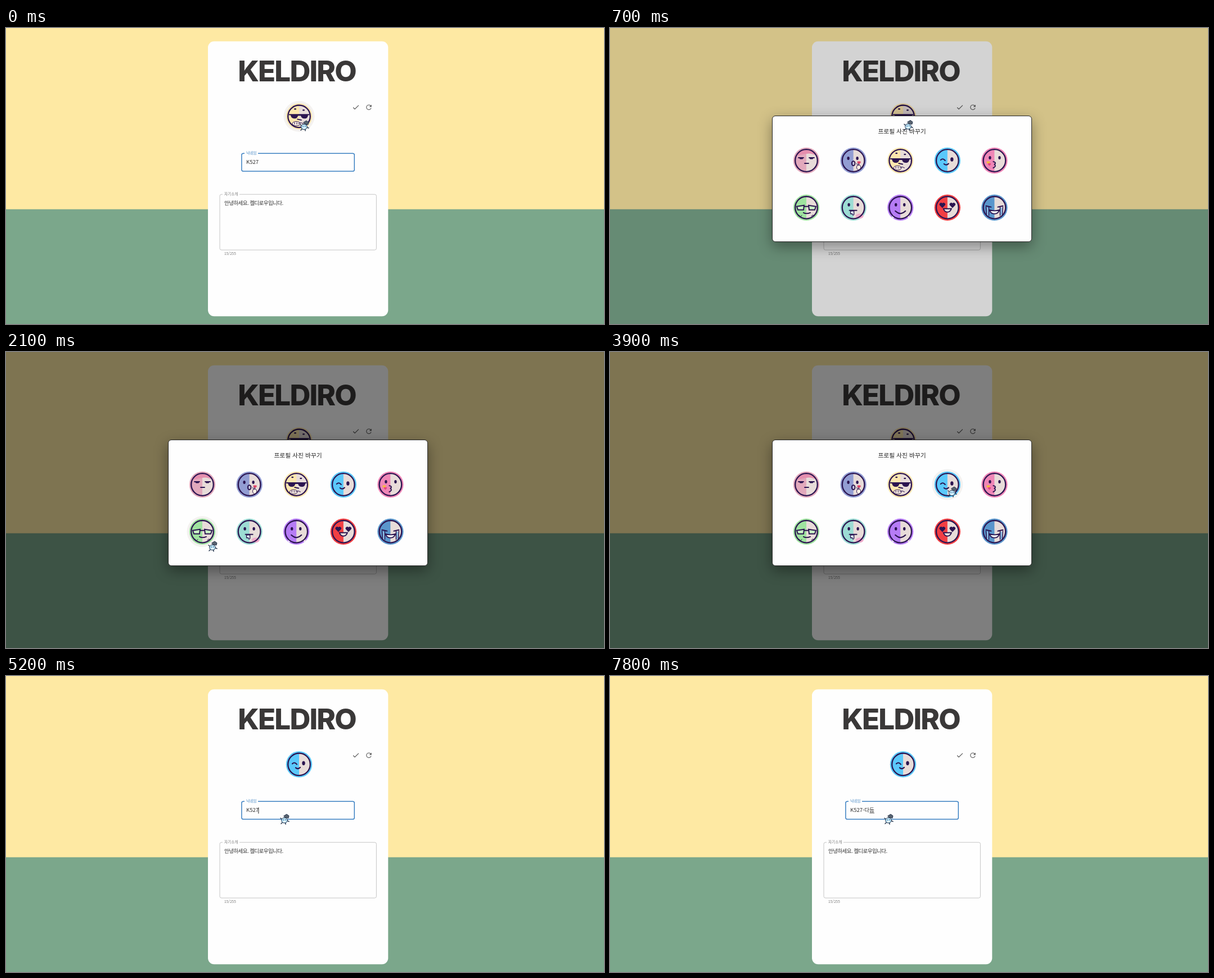
Recreate the animation shown at these times as an HTML page. Size 1063x527 px, loop 8000 ms.

```html
<!DOCTYPE html>
<html lang="ko">
<head>
<meta charset="utf-8">
<title>Profile editor</title>
<style>
  html, body { margin: 0; width: 100%; height: 100%; overflow: hidden; background: #7ba78b; }
  svg { display: block; width: 100%; height: 100%; }
  text { font-family: "Noto Sans CJK KR", "Noto Sans CJK", "Noto Sans", sans-serif; fill: #333; white-space: pre; }
  .brand { font: 800 51px Inter, sans-serif; letter-spacing: -1.8px; fill: #3a3838; text-anchor: middle; }
  .small { font-size: 6.6px; fill: #777; }
  .value { font-size: 9.5px; }
  .intro { letter-spacing: -.55px; }
  .title { font-size: 10.75px; fill: #222; text-anchor: middle; }
  .panel { filter: drop-shadow(0 8px 12px rgba(0, 0, 0, .38)); }
  .ink { fill: none; stroke: #2b1450; stroke-width: 2; stroke-linecap: round; stroke-linejoin: round; }
  .solid { fill: #2b1450; }
  .ring { fill: #f4f2f0; }
</style>
</head>
<body>
<svg viewBox="0 0 1063 527" preserveAspectRatio="none">
  <rect width="1063" height="323" fill="#fee9a3"/>
  <rect y="322.7" width="1063" height="204.3" fill="#7ba78b"/>
  <rect x="359" y="23.7" width="320.3" height="489.6" rx="11" fill="#fefefe"/>
  <text class="brand" x="517" y="95">KELDIRO</text>
  <g fill="#5c5c5c">
    <path transform="translate(614.7 133.9) scale(.6)" d="M9 16.17 4.83 12l-1.42 1.41L9 19 21 7l-1.41-1.41z"/>
    <path transform="translate(637.8 134) scale(.6)" d="M17.65 6.35A8 8 0 1 0 19.73 14h-2.08A6 6 0 1 1 12 6c1.66 0 3.14.69 4.22 1.78L13 11h7V4z"/>
  </g>
  <g id="main"></g>

  <rect id="field" x="418.9" y="223.3" width="200.4" height="31.8" rx="3" fill="none"/>
  <rect x="424" y="220" width="24" height="6" fill="#fefefe"/>
  <text id="label" class="small" x="427" y="224.7">닉네임</text>
  <text id="name" class="value" x="427" y="241.8"></text>
  <path id="under" stroke="#333" stroke-width=".8"/>
  <path id="caret" stroke="#222" stroke-width="1"/>

  <rect x="380" y="296.2" width="278.4" height="99" rx="3" fill="none" stroke="#c6c6c6"/>
  <rect x="385" y="293" width="30" height="6" fill="#fefefe"/>
  <text class="small" x="388" y="297.7">자기소개</text>
  <text class="value intro" x="388" y="314.6">안녕하세요. 켈디로우입니다.</text>
  <text class="small" x="388" y="404">15/255</text>

  <rect id="shade" width="1063" height="527"/>
  <g id="dialog">
    <rect class="panel" x="288.5" y="156.5" width="461" height="224" rx="5.5" fill="#fefefe" stroke="#242424"/>
    <text class="title" x="519" y="188">프로필 사진 바꾸기</text>
    <g id="grid"></g>
  </g>

  <g id="cursor" stroke="#27374f" stroke-linecap="round" stroke-linejoin="round">
    <path d="M-3 1L-7 -2M-3 5L-6 8M2 6L2 9M5 3L8 4" fill="none" stroke-width="1.5"/>
    <ellipse cx="0" cy="2" rx="5.4" ry="4.8" fill="#b9e3f8" stroke-width="1"/>
    <path d="M-3 4Q0 7 3 3" fill="#fff" stroke="none"/>
    <path d="M-2 .8v.8M2 .4v.8" stroke-width="1"/>
    <path d="M-1 -6L4 -9L8 -6L7 -2L1 -3Z" fill="#59636f" stroke-width="1"/>
  </g>
</svg>
<script>
const $ = id => document.getElementById(id);
const ink = (d, w = 2) => `<path class="ink" style="stroke-width:${w}" d="${d}"/>`;
const dot = (x, y, rx = 2.2, ry = 3) => `<ellipse class="solid" cx="${x}" cy="${y}" rx="${rx}" ry="${ry}"/>`;
const blob = (x, y, rx, ry, fill) => `<ellipse cx="${x}" cy="${y}" rx="${rx}" ry="${ry}" fill="${fill}"/>`;
const heart = (x, y, s, fill) =>
  `<path transform="translate(${x} ${y}) scale(${s})" fill="${fill}" d="M0 4L-4 0A2.3 2.3 0 0 1 0-3A2.3 2.3 0 0 1 4 0Z"/>`;
const hand = (x, y, rx, ry) =>
  `<ellipse cx="${x}" cy="${y}" rx="${rx}" ry="${ry}" fill="#fff3e6" stroke="#2b1450"/>`;

// Colour and features of each face, around its centre
const faces = [
  ["#e2a9bc",
    `<path d="M-17-9A19.3 19.3 0 0 1 17-9Q8-14 0-12Q-9-10-17-9Z" fill="#e58fae"/>` +
    ink("M-14-5H-5M5-5H14", 1.8) + ink("M-11-3.6H-7M7-3.6H11", 2) + ink("M-3 5H4", 1.8)],
  ["#929dd3",
    dot(-9, -4) + dot(7, -4) +
    `<ellipse class="ink" cx="0" cy="5" rx="2.8" ry="4"/>` +
    heart(10, 4, .7, "#e2496c") + hand(9.5, 12, 3.6, 4.6) + ink("M8 9l-2-4M10 9l-1-4", 1)],
  ["#fce6ae",
    dot(-7, -13, 2, 1.2) + dot(8, -11, 2, 1.2) +
    `<path class="solid" d="M-18-4H18V-2H16Q15 4 10 4Q4 4 3-1H-2Q-3 4-8 4Q-14 4-15-2H-18Z"/>` +
    ink("M-3 5L4 6.5", 1.8) + hand(-5, 13, 7, 3.8) + ink("M-8 14v-3M-4 14v-3M-1 13q4-3 8 0", 1.1)],
  ["#5ac8fb",
    ink("M-12-1Q-8-5-4 0", 2.1) + dot(8, -2, 2.7, 3.7) + ink("M-6 6Q-2 9.5 2 5.5", 2.3)],
  ["#ef86b7",
    dot(-8, -5) + dot(9, -5) + ink("M-2 2Q4 3 0 7Q4 10-2 13", 2) +
    heart(-11, 4, .7, "#f5b942") + heart(-9, 7, .6, "#e9447f")],
  ["#9fe39f",
    `<path d="M-17-2L-4-4L-5 4H-15ZM4-4L17-2L15 4H5Z" fill="#c8f2c4" stroke="#2b1450" stroke-width="2"/>` +
    ink("M-4-2H4", 2) + ink("M-5 9Q0 12 7 9", 2) +
    ink("M-15 15l2-2l2 3l3-2M9 15l3-2l2 2", 1)],
  ["#9cdcd4",
    dot(-8, -5) + dot(8, -5) + ink("M-7 5H6") +
    `<path d="M-5 6H1V12Q-1 15-2 11H-5Z" fill="#e6fbff" stroke="#2b1450" stroke-width="1.4"/>` +
    blob(11, 15, 7, 4.4, "#eeaac9")],
  ["#b67cf5",
    dot(-8, -5) + dot(7, -5) + ink("M-9 6Q0 15 9 6", 2.2) +
    blob(-13, 16, 2, 3, "#efe3ff") + blob(14, 15, 2, 3, "#fff3e6")],
  ["#f23f43",
    heart(-9, -4, 1.15, "#2b1450") + heart(9, -4, 1.15, "#2b1450") +
    `<path d="M-7 2H7Q5 8 0 8Q-5 8-7 2Z" fill="#f6e4df" stroke="#2b1450" stroke-width="2"/>`],
  ["#5a96cc",
    ink("M-15-3L-6-1M6-1L15-3") +
    `<path d="M-9 4Q0 7 9 4Q7 11 0 11Q-7 11-9 4Z" fill="#f2f5f8" stroke="#2b1450" stroke-width="1.8"/>` +
    `<path d="M-12 0V14M12 0V14" stroke="#8cbfe6" stroke-width="3"/>` +
    ink("M-10-1V14M-15-1L-14 12M10-1V14M15-1L14 12", 1.5)]
];

const face = (i, x, y) => {
  const [color, parts] = faces[i];
  return `<g transform="translate(${x} ${y})"><circle class="ring" r="27.5"/>
    <circle r="23.2" fill="${color}"/><path d="M0-19.7A19.7 19.7 0 0 1 0 19.7Z" fill="#e8dcd9"/>
    ${parts}<circle class="ink" r="19.8" style="stroke-width:2.3"/></g>`;
};

const spots = faces.map((_, i) => [349 + (i % 5) * 83.6, i < 5 ? 236 : 319.8]);
$("grid").innerHTML = spots.map((p, i) => face(i, ...p)).join("");
$("main").innerHTML = [2, 3].map(i => face(i, 521, 157.3)).join("");
const [oldFace, newFace] = $("main").children;
const gridRings = [...$("grid").querySelectorAll(".ring")];
const show = (el, on) => { el.style.display = on ? "" : "none"; };

// Pointer route: time, x, y
const route = [
  [0, 530, 174], [1000, 530, 173], [1100, 540, 192], [1300, 697, 318], [1500, 530, 405],
  [1700, 335, 380], [1800, 315, 350], [1900, 340, 342], [2000, 356, 344],
  [2100, 367, 346], [2500, 367, 346], [2800, 449, 338], [2900, 449, 338],
  [3200, 525, 328], [3600, 647, 232], [3800, 612, 248], [3900, 608, 249],
  [4400, 608, 249], [4900, 494, 254], [5100, 494, 254], [5200, 495, 255], [8000, 495, 255]
];
const pointer = t => {
  const k = route.findIndex(p => p[0] > t);
  const [t0, x0, y0] = route[k - 1], [t1, x1, y1] = route[k];
  const f = (t - t0) / (t1 - t0);
  return [x0 + (x1 - x0) * f, y0 + (y1 - y0) * f];
};

// Typing: time, text, caret x, start of the syllable being composed
const typing = [
  [0, "K527", 448.5, 0], [6400, "K527-", 453, 0], [6600, "K527-ㄷ", 461.5, 453],
  [6800, "K527-다", 462, 453], [7000, "K527-닫", 463, 453],
  [7600, "K527-다드", 470, 461.5], [7700, "K527-다듬", 470, 461.5]
];
const blinks = [[4900, 5400], [5800, 6300], [6400, 7400], [7600, 7800]];
const fade = { 600: .06, 700: .17, 800: .36 };

function draw(now) {
  const t = Math.floor(now % 8000 / 100) * 100;
  const [x, y] = pointer(t);
  $("cursor").setAttribute("transform", `translate(${x} ${y})`);

  const open = t >= 600 && t < 4200;
  show($("dialog"), open);
  $("dialog").style.opacity = t === 600 ? .6 : 1;
  $("shade").style.opacity = open ? fade[t] ?? .5 : 0;
  gridRings.forEach((r, i) => show(r, Math.hypot(x - 9 - spots[i][0], y - 9 - spots[i][1]) < 23));
  show(oldFace, t < 4200);
  show(newFace, t >= 4200);
  show(oldFace.querySelector(".ring"), t < 600);
  show(newFace.querySelector(".ring"), false);

  const focus = t < 400 || t >= 4900;
  $("field").setAttribute("stroke", focus ? "#3b80c2" : t >= 4200 ? "#484848" : "#c6c6c6");
  $("field").setAttribute("stroke-width", focus ? 1.5 : 1);
  $("label").style.fill = focus ? "#3b80c2" : "#777";

  const [, text, end, start] = typing.filter(s => s[0] <= t).pop();
  $("name").textContent = text;
  show($("under"), start > 0);
  $("under").setAttribute("d", `M${start} 244H${end}`);
  show($("caret"), blinks.some(b => t >= b[0] && t < b[1]));
  $("caret").setAttribute("d", `M${end + .4} 234V245`);
}

const begin = performance.now();
const tick = () => { draw(performance.now() - begin); requestAnimationFrame(tick); };
tick();
</script>
</body>
</html>
```
